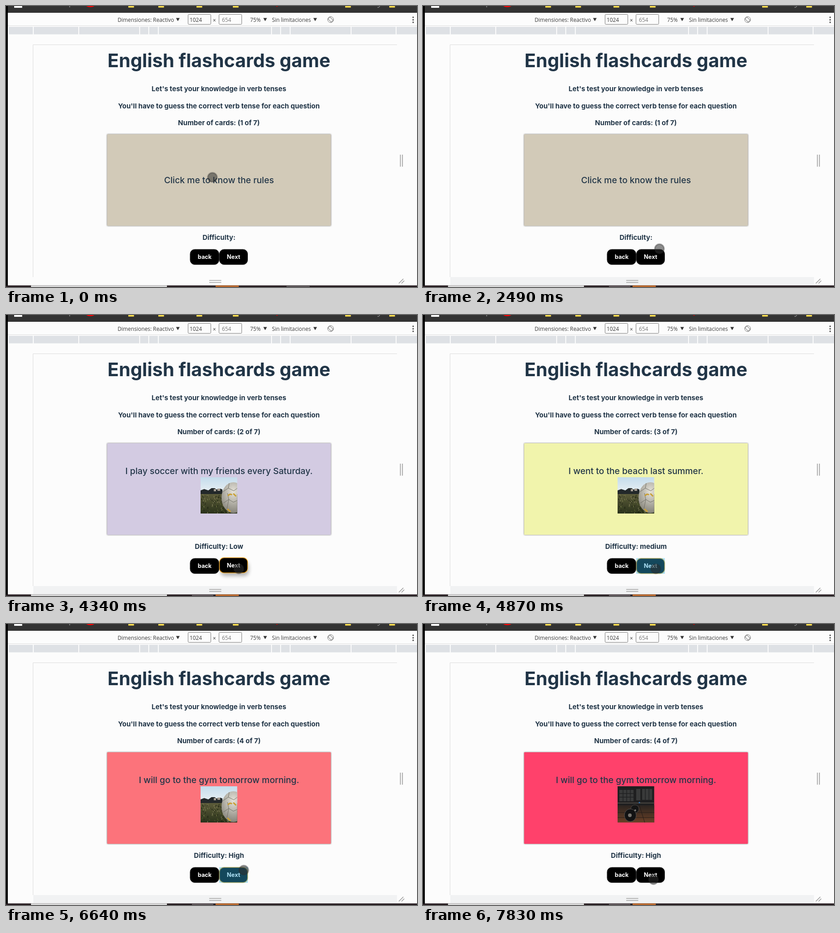
These frames come from a looping animation (904x620 px, 8 s). An HTML page:

```html
<!DOCTYPE html>
<html lang="en">
<head>
<meta charset="utf-8">
<title>English flashcards game</title>
<style>
  html, body { margin: 0; width: 100%; height: 100%; overflow: hidden; background: #fcfcfc; }
  svg { display: block; width: 904px; height: 620px; }
  text { font-family: Inter, sans-serif; font-optical-sizing: none; fill: #213547; }
  .mid text, text.mid { text-anchor: middle; }
  .h1 { font-size: 40.96px; font-weight: 700; }
  .h3 { font-size: 15px; font-weight: 700; }
  .line { font-size: 19.2px; font-weight: 500; }
  .btn { font-size: 12.8px; font-weight: 700; fill: #fff; }
  .tool text { font: 11.8px "Open Sans", "Noto Sans", sans-serif; fill: #3c3c3c; }
  #card { filter: drop-shadow(0 0 1.5px rgba(0,0,0,.6)); }
</style>
</head>
<body>
<svg viewBox="0 0 904 620">
  <defs>
    <linearGradient id="sky" x2="0" y2="1"><stop stop-color="#c4dcec"/><stop offset="1" stop-color="#f0f4f5"/></linearGradient>
    <linearGradient id="grass" x2="0" y2="1"><stop stop-color="#5d5c3a"/><stop offset="1" stop-color="#29311a"/></linearGradient>
    <linearGradient id="floor" x2="0" y2="1"><stop stop-color="#2b2420"/><stop offset="1" stop-color="#6b4127"/></linearGradient>
    <radialGradient id="leather" cx=".5" cy=".3" r=".7"><stop stop-color="#e6e3da"/><stop offset="1" stop-color="#86847a"/></radialGradient>
    <clipPath id="photoClip"><rect id="photoArea" width="80.5" height="80"/></clipPath>
    <filter id="soft" x="-50%" y="-50%" width="200%" height="200%"><feGaussianBlur stdDeviation="4"/></filter>
  </defs>

  <!-- browser chrome -->
  <rect width="904" height="620" fill="#fcfcfc"/>
  <rect width="904" height="15" fill="#333"/>
  <rect x="18" width="17.5" height="4" fill="#fff"/>
  <ellipse cx="185.500" cy="-2" rx="10" ry="4.500" fill="#f00"/>
  <circle cx="596" cy="0" r="1.800" fill="#c00"/>
  <path d="M140 0v3M817 3q4 1 5-3" stroke="#bbb" fill="none"/>
  <g id="folders" fill="#f6d84c"></g>
  <path d="M4 43.500H904" stroke="#ddd"/>
  <g id="ruler" fill="#dee1e5"></g>
  <g class="tool">
    <text x="245.500" y="34.500">Dimensiones: Reactivo</text>
    <text x="404" y="34.500">1024</text>
    <text x="455" y="36">×</text>
    <text x="475" y="34.500" style="fill:#777">654</text>
    <text x="537" y="34.500">75%</text>
    <text x="585" y="34.500">Sin limitaciones</text>
    <g fill="none" stroke="#767676">
      <rect x="400.500" y="18.500" width="50" height="22" rx="2"/>
      <rect x="468.500" y="18.500" width="50" height="22" rx="2"/>
      <circle cx="714" cy="30" r="6.500"/>
      <rect x="711" y="25" width="6" height="10" rx="1" transform="rotate(-45 714 30)"/>
    </g>
    <path d="M374 26.500h8l-4 7zM566 26.500h8l-4 7zM676 26.500h8l-4 7z" fill="#333"/>
    <g fill="#555"><circle cx="895.500" cy="25" r="1.700"/><circle cx="895.500" cy="30.500" r="1.700"/><circle cx="895.500" cy="36" r="1.700"/></g>
  </g>
  <path d="M59.500 598V85.500H860" fill="none" stroke="#dcdcdc"/>
  <rect id="strip" x="60" y="598" width="800" height="18" fill="#f1f2f3"/>
  <path d="M867.500 328v26.500M872 328v26.500M447 605.500h26.500M447 610h26.500M864 612l10-10M870 612l6-6" stroke="#a0a0a0" stroke-width="1.700"/>
  <rect y="616.500" width="904" height="4" fill="#2a2024"/>
  <rect x="55" y="616.500" width="299" height="4" fill="#d8d8d8"/>
  <rect x="461" y="616.500" width="51" height="4" fill="#b9692f"/>
  <rect id="taskBefore" x="617" y="616.500" width="51" height="4" fill="#5c5659"/>
  <rect id="taskAfter" x="409" y="616.500" width="47" height="4" fill="#5f565a"/>
  <rect width="4" height="617" fill="#000"/>

  <!-- page -->
  <g class="mid">
    <text class="h1" x="468.300" y="135">English flashcards game</text>
    <text class="h3" x="468.300" y="187.500">Let's test your knowledge in verb tenses</text>
    <text class="h3" x="468.300" y="225.500">You'll have to guess the correct verb tense for each question</text>
    <text class="h3" id="counter" x="468.300" y="263"></text>
    <rect id="card" y="283" height="202" rx="1"/>
    <text class="line" id="line1" x="468.500"></text>
    <text class="line" id="line2" x="468.500" y="405">question</text>
    <text class="h3" id="difficulty" x="468.500" y="515.700"></text>
  </g>

  <g transform="translate(428 358)" clip-path="url(#photoClip)">
    <g id="ballPhoto">
      <rect width="81" height="40" fill="url(#sky)"/>
      <path d="M0 29l8-3 9 3 7-5h7l4 3 8-2 5 2v14H0z" fill="#23282a"/>
      <path d="M29 26h5v5h-5zM37 25h6v5h-6z" fill="#a49c91"/>
      <rect y="37" width="81" height="44" fill="url(#grass)"/>
      <g id="blades" fill="none" stroke-width="1.200"></g>
      <ellipse cx="72" cy="45" rx="26" ry="34" fill="url(#leather)"/>
      <path d="M49 32l12-8 12 6 8-6M61 24l2-11M50 57l12-8 10 6 9-4M62 49l-3-14M62 49l-4 20" fill="none" stroke="#6a695f" stroke-width=".9"/>
      <path d="M60 41q5-6 9-2M72 36l6 6M59 70l7 6" stroke="#c99f33" stroke-width="3" fill="none"/>
    </g>
    <g id="gymPhoto">
      <rect width="81" height="81" fill="#1f1f20"/>
      <path d="M4 8h31v25H4zM41 6h9v25h-9zM54 6h22v24H54z" fill="#393a3a"/>
      <path d="M4 16h31M4 24h31M12 8v25M20 8v25M28 8v25M61 6v24M69 6v24" stroke="#202122" stroke-width="1.500"/>
      <path d="M0 37h81" stroke="#59534c" stroke-width="1.500"/>
      <rect y="42" width="81" height="39" fill="url(#floor)"/>
      <path d="M0 58h81M0 69h81M48 42l12 39" stroke="#251c18"/>
      <circle cx="38" cy="50" r="9" fill="#151515" stroke="#4c4a48"/>
      <path d="M28 62l12-10" stroke="#8a8783" stroke-width="3"/>
      <ellipse cx="28" cy="64" rx="13" ry="14" fill="#121213" stroke="#55524f"/>
      <circle cx="27" cy="64" r="4" fill="#77736d"/>
      <circle cx="48" cy="36" r="1.500" fill="#2d7fd0"/>
    </g>
  </g>

  <rect x="405" y="537" width="63.500" height="33.500" rx="10" stroke="#2b2b2b"/>
  <text class="btn mid" x="437" y="558">back</text>
  <rect id="nextShadow" x="472" y="544" width="62" height="32" rx="10" fill="#000" filter="url(#soft)"/>
  <g id="next">
    <rect id="nextBox" x="469.500" y="537" width="62" height="33.500" rx="10"/>
    <text class="btn mid" x="500.500" y="558">Next</text>
  </g>
  <rect id="tap" x="469" y="536.500" width="63" height="34.500" fill="#33b5e5" fill-opacity=".4"/>

  <circle id="pointer" r="10.300" stroke-width="3"/>
</svg>

<script>
const LOOP = 8000;
const $ = id => document.getElementById(id);
const show = (id, on) => $(id).style.display = on ? '' : 'none';
const set = (id, attrs) => { for (const k in attrs) $(id).setAttribute(k, attrs[k]); };
const clamp = p => Math.max(0, Math.min(1, p));
const mix = (a, b, p) => a + (b - a) * p;

$('folders').innerHTML = [269, 335, 419, 499, 746, 843]
  .map(x => `<rect x="${x}" width="12.500" height="3.500"/>`).join('');
const ticks = [5, 60, 160, 294, 314, 335, 584, 604, 625, 759, 858, 905];
$('ruler').innerHTML = ticks.slice(1)
  .map((x, i) => `<rect x="${ticks[i] + 1}" y="46" width="${x - ticks[i] - 2}" height="16.500"/>`).join('');

// short grass blades from a seeded generator
let seed = 7;
const random = () => (seed = seed * 16807 % 2147483647) / 2147483647;
$('blades').innerHTML = Array.from({ length: 170 }, () => {
  const x = random() * 80, y = 41 + random() * 40;
  const color = ['#1c2211', '#85825a', '#4b5529'][Math.floor(random() * 3)];
  return `<path d="M${x} ${y}l${random() * 4 - 2}-3" stroke="${color}"/>`;
}).join('');

const BEIGE = [210, 202, 184], LILAC = [211, 203, 226], YELLOW = [244, 247, 167], RED = [255, 65, 107];
const INTRO = { n: 1, level: '', color: BEIGE, y: 391, text: 'Click me to know the rules' };
const RULES = { ...INTRO, y: 376, wide: true,
  text: 'Do click to the card to know the correct answer. Press button next to see the next' };
const PRESENT = { n: 2, level: ' Low', color: LILAC, y: 350.5, text: 'I play soccer with my friends every Saturday.' };
const PAST = { n: 3, level: ' medium', color: YELLOW, y: 350.5, text: 'I went to the beach last summer.' };
const FUTURE = { n: 4, level: ' High', color: RED, y: 350.5, text: 'I will go to the gym tomorrow morning.' };

const scenes = [
  [0, INTRO], [1270, RULES], [2000, INTRO], [2910, PRESENT], [4700, PAST],
  [5560, { ...PAST, text: 'Past simple' }], [5960, PAST],
  [6530, FUTURE], [7070, { ...FUTURE, text: 'Future simple' }], [7560, FUTURE],
];
// time, x, y of the pointer
const path = [
  [0, 454, 378], [1270, 454, 378], [1670, 500, 420], [2010, 500, 420], [2600, 522, 547],
  [2660, 522, 547], [2690, 512, 560], [5290, 512, 560], [5500, 547, 420], [5960, 547, 420],
  [6370, 517, 566], [6570, 519, 560], [6640, 523, 543], [6940, 540, 420], [7560, 540, 420],
  [7830, 507, 564], [LOOP, 507, 564],
];
const presses = [[1140, 1270], [1870, 2000], [2880, 2950], [4670, 4740], [5500, 5580],
  [5890, 5960], [6510, 6570], [7000, 7080], [7500, 7570]];
// Next is tapped, then stays raised until the card is tapped
const taps = [[2910, 4700], [4700, 5500], [6530, 7000]];

function pointerAt(t) {
  const i = path.findIndex(k => k[0] > t);
  const [a, b] = [path[i - 1], path[i]];
  const p = (t - a[0]) / (b[0] - a[0]);
  const s = p * p * (3 - 2 * p);
  return [mix(a[1], b[1], s), mix(a[2], b[2], s)];
}

function draw(t) {
  const index = scenes.findLastIndex(s => s[0] <= t);
  const [start, scene] = scenes[index];
  const before = scenes[Math.max(0, index - 1)][1].color;
  const fade = 1 - (1 - clamp((t - start) / 250)) ** 2.2;
  const color = scene.color.map((c, i) => Math.round(mix(before[i], c, fade)));
  set('card', { x: scene.wide ? 82 : 222.5, width: scene.wide ? 773 : 492, fill: `rgb(${color})` });
  $('counter').textContent = `Number of cards: (${scene.n} of 7)`;
  $('difficulty').textContent = 'Difficulty:' + scene.level;
  $('line1').textContent = scene.text;
  set('line1', { y: scene.y });
  show('line2', scene.wide);

  show('strip', t >= 1270);
  show('taskAfter', t >= 1270);
  show('taskBefore', t < 1270);

  show('ballPhoto', t >= 3200 && t < 7000);
  show('gymPhoto', t >= 7000);
  set('photoArea', { height: t < 4340 ? 24 : 80 });

  const tap = taps.find(([from, to]) => t >= from && t < to);
  const lift = tap ? clamp((t - tap[0] - 190) / 120) : 0;
  show('tap', tap && t < tap[0] + 190);
  set('next', { transform: `translate(0 ${-1.5 * lift})` });
  set('nextBox', { stroke: tap ? '#e9a326' : '#2b2b2b', 'stroke-width': tap ? 1.5 : 1 });
  set('nextShadow', { opacity: 0.28 * lift });

  const [cx, cy] = pointerAt(t);
  const pressed = presses.some(([from, to]) => t >= from && t < to);
  set('pointer', { cx, cy,
    fill: pressed ? 'rgba(182,176,25,.8)' : 'rgba(45,45,45,.54)',
    stroke: pressed ? 'rgba(216,208,50,.75)' : 'rgba(45,45,45,.32)' });
}

const origin = performance.now();
function tick() {
  draw((performance.now() - origin) % LOOP);
  requestAnimationFrame(tick);
}
tick();
</script>
</body>
</html>
```
